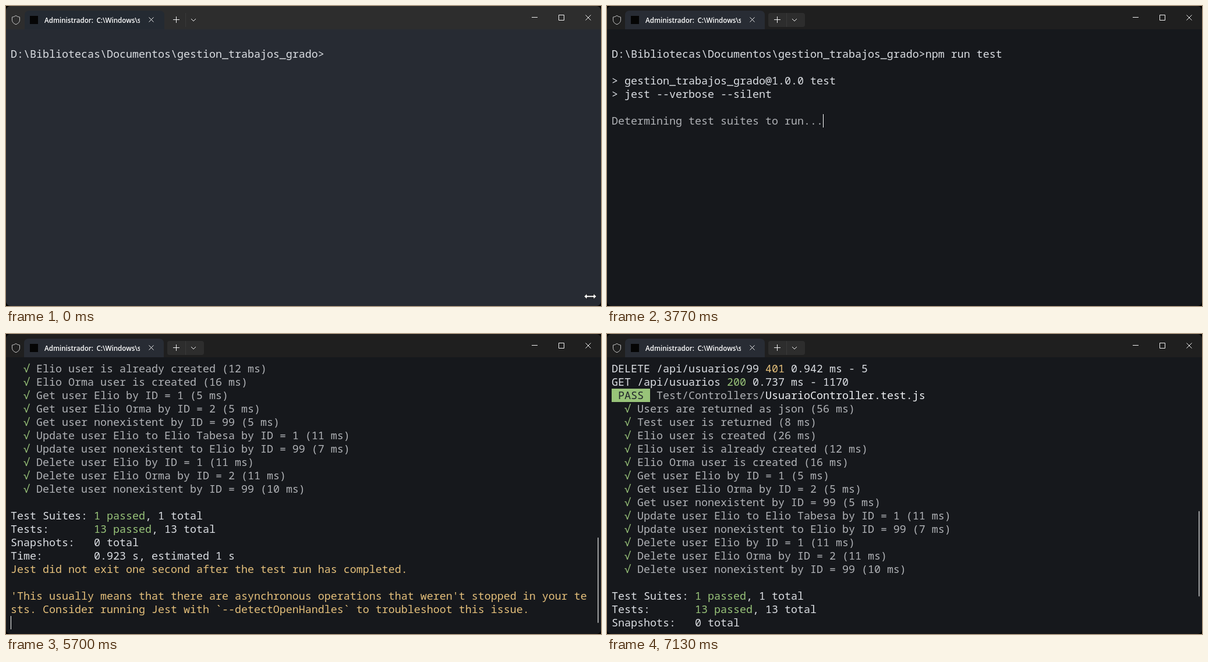
Animation, 1022 px wide and 516 px high, one loop 8000 ms. Source, as an HTML page:

```html
<!DOCTYPE html>
<html lang="es">
<head>
<meta charset="utf-8">
<title>Terminal</title>
<style>
html, body { margin: 0; width: 100%; height: 100%; overflow: hidden; background: #000; }
svg { display: block; width: 1022px; height: 516px; }
text { white-space: pre; }
#rows { font: 500 18.333px "Noto Sans Mono", "DejaVu Sans Mono", monospace; }
#title { font: 600 11.6px "Open Sans", "Noto Sans", sans-serif; fill: #fff; }
.w { fill: #dcdfe4; }
.b { fill: #f0f2f5; }
.d { fill: #b1b3b7; }
.m { fill: #737985; }
.g { fill: #98c379; }
.y { fill: #e5c07b; }
.k { fill: #20242a; }
.line { fill: none; stroke: #f2f2f2; stroke-width: 1; }
</style>
</head>
<body>
<svg viewBox="0 0 1022 516" xmlns="http://www.w3.org/2000/svg">
  <defs>
    <clipPath id="window"><rect width="1022" height="516" rx="8"/></clipPath>
    <clipPath id="label"><rect x="64" y="14" width="166" height="22"/></clipPath>
  </defs>
  <g clip-path="url(#window)">
    <rect id="bar" width="1022" height="40"/>
    <rect id="body" y="40" width="1022" height="476"/>
    <path id="tab" d="M0 40V16q0-8 8-8h224q8 0 8 8v24z"/>
    <path class="line" style="stroke:#c4c4c4" d="M17 16.5q3 2.4 6.5 2.6v5q0 5-6.500 7.700q-6.500-2.700-6.500-7.700v-5q3.500-.2 6.500-2.600z"/>
    <rect x="41" y="17" width="14" height="14" fill="#050505"/>
    <g id="title" clip-path="url(#label)">
      <text x="66" y="29">Administrador:</text>
      <text id="task" x="155.500" y="29"></text>
    </g>
    <rect id="split" x="277" y="12" width="63" height="24" rx="4" fill="#2d2d2d"/>
    <path d="M308.500 12v24" stroke="#3a3a3a"/>
    <path class="line" d="M245.500 19.500l8 8m0-8l-8 8M287 23.500h11M292.500 18v11M318 22l4 4 4-4M903 19.500h10M949.500 15.500h9v9h-9zM995.500 15.500l9 9m0-9l-9 9"/>
    <g id="rows"></g>
    <rect id="caret" width="1" height="23" fill="#fff"/>
    <rect id="thumb" x="1016" width="2" height="147" rx="1" fill="#9c9d9f"/>
  </g>
  <path id="resize" d="M993 499.500l5-5v3.500h11v-3.500l5 5-5 5v-3.500h-11v3.500z" fill="#fff" stroke="#000" stroke-width=".8"/>
  <path id="pointer" d="M0 0v16.500l3.800-3.600 2.500 5.900 2.700-1.200-2.500-5.700h5.300z" fill="#fff" stroke="#000" stroke-width=".9"/>
</svg>
<script>
const LOOP = 8000, CELL = 11, LINE = 23, LEFT = 8, TOP = 48, ROWS = 20;
const $ = id => document.getElementById(id);

// A tilde and a letter switch the text colour.
const prompt = 'D:\\Bibliotecas\\Documentos\\gestion_trabajos_grado>';
const command = 'npm run test';
const keyTimes = [930, 1130, 1200, 1400, 1570, 1670, 1770, 1900, 2200, 2300, 2370, 2530];
const script = ['', '> gestion_trabajos_grado@1.0.0 test', '> jest --verbose --silent', ''];
const suite = '~d Test/Controllers/~bUsuarioController.test.js';
const runs = '~k RUNS ' + suite, pass = '~k PASS ' + suite;

const request = (verb, id, code, ms, size) =>
  `${verb} /api/usuarios${id && '/' + id} ~${code < 300 ? 'g' : 'y'}${code}~w ${ms} ms - ${size}`;

const logs = ['~m✓ ~gUsers~d (0.7298ms)', ...[
  ['GET', '', 200, '24.428', 1170],
  ['GET', '', 200, '1.424', 1170],
  ['GET', '', 200, '1.263', 1170],
  ['POST', '', 201, '12.651', 138],
  ['GET', '', 200, '1.044', 1309],
  ['GET', '', 200, '0.875', 1309],
  ['POST', '', 401, '1.130', 72],
  ['GET', '', 200, '1.343', 1309],
  ['GET', '', 200, '1.040', 1309],
  ['POST', '', 201, '3.474', 153],
  ['GET', '', 200, '0.973', 1463],
  ['GET', '1', 200, '1.311', 138],
  ['GET', '2', 200, '1.065', 153],
  ['GET', '99', 401, '1.119', 72],
  ['PUT', '1', 200, '4.053', 157],
  ['GET', '1', 200, '0.973', 157],
  ['PUT', '99', 401, '1.027', 72],
  ['GET', '', 200, '0.894', 1482],
  ['DELETE', '1', 200, '3.126', 5],
  ['GET', '', 200, '0.815', 1324],
  ['DELETE', '2', 200, '3.048', 5],
  ['GET', '', 200, '0.782', 1170],
  ['DELETE', '99', 401, '0.942', 5],
  ['GET', '', 200, '0.737', 1170]
].map(r => request(...r))];

const tests = [
  'Users are returned as json (56 ms)',
  'Test user is returned (8 ms)',
  'Elio user is created (26 ms)',
  'Elio user is already created (12 ms)',
  'Elio Orma user is created (16 ms)',
  'Get user Elio by ID = 1 (5 ms)',
  'Get user Elio Orma by ID = 2 (5 ms)',
  'Get user nonexistent by ID = 99 (5 ms)',
  'Update user Elio to Elio Tabesa by ID = 1 (11 ms)',
  'Update user nonexistent to Elio by ID = 99 (7 ms)',
  'Delete user Elio by ID = 1 (11 ms)',
  'Delete user Elio Orma by ID = 2 (11 ms)',
  'Delete user nonexistent by ID = 99 (10 ms)'
].map(s => '  ~g√~d ' + s);

const summary = [
  '',
  'Test Suites: ~g1 passed~w, 1 total',
  'Tests:       ~g13 passed~w, 13 total',
  'Snapshots:   0 total',
  'Time:        0.923 s, estimated 1 s'
];
const warning = [
  '~yJest did not exit one second after the test run has completed.',
  '',
  "~y'This usually means that there are asynchronous operations that weren't stopped in your te",
  '~ysts. Consider running Jest with `--detectOpenHandles` to troubleshoot this issue.'
];

const clamp = x => Math.max(0, Math.min(1, x));
const between = (t, a, b) => t >= a && t < b;
const mix = (a, b, k) => `rgb(${a.map((v, i) => Math.round(v + (b[i] - v) * k))})`;
const escape = s => s.replace(/&/g, '&amp;').replace(/</g, '&lt;').replace(/>/g, '&gt;');

function rowMarkup(line, i) {
  if (!line) return '';
  const y = TOP + i * LINE;
  const spans = ('~w' + line).split('~').slice(1).filter(p => p.length > 1)
    .map(p => `<tspan class="${p[0]}">${escape(p.slice(1))}</tspan>`).join('');
  const badge = line.startsWith('~k')
    ? `<rect class="${line === runs ? 'y' : 'g'}" x="${LEFT}" y="${y}" width="${6 * CELL}" height="${LINE}"/>` : '';
  return `${badge}<text x="${LEFT}" y="${y + 18}">${spans}</text>`;
}

// All lines printed so far, with the caret's cell.
function terminal(t) {
  const typed = keyTimes.filter(k => t >= k).length;
  const first = prompt + command.slice(0, typed);
  const lines = ['', first];
  if (t < 2900) return { lines, col: first.length, row: 1 };
  if (t < 3200) return { lines, col: 0, row: 2 };
  lines.push(...script);
  if (t < 3770) return { lines, col: 0, row: 6 };
  if (t < 3870) {
    const wait = 'Determining test suites to run...';
    lines.push('~d' + wait);
    return { lines, col: wait.length, row: 6 };
  }
  if (t < 4730) {
    const count = t < 4530 ? 0 : Math.min(logs.length, 2 + 5 * Math.floor((t - 4530) / 33.3));
    lines.push(...logs.slice(0, count), '', runs);
    return { lines, col: 0, row: lines.length - (count ? 1 : 0) };
  }
  lines.push(...logs, pass, ...tests, ...summary);
  if (t >= 5700) lines.push(...warning);
  lines.push('');
  return { lines, col: 0, row: lines.length - 1 };
}

const caretOff = [[0, 140], [670, 930], [3530, 3770], [4060, 4590], [4670, 5200], [5730, 6230]];

function pointerAt(t) {
  const enter = 1 - (1 - clamp((t - 6230) / 170)) ** 2;
  const leave = clamp((t - 6830) / 200) ** 2;
  return [1015 - 140 * enter + 150 * leave, 486 - 27 * enter + 12 * leave];
}

const show = (id, on) => $(id).setAttribute('visibility', on ? 'visible' : 'hidden');
let lastRows = null;

function draw(t) {
  const focus = clamp((t - 70) / 300);
  $('bar').setAttribute('fill', mix([45, 45, 45], [31, 31, 31], focus));
  $('body').setAttribute('fill', mix([39, 43, 51], [22, 24, 28], focus));
  $('tab').setAttribute('fill', mix([36, 42, 50], [40, 44, 52], focus));
  $('tab').setAttribute('transform', `translate(${t < 70 ? 32 : 31})`);
  $('split').setAttribute('opacity', focus);
  show('resize', t < 100);
  $('task').textContent = between(t, 2930, 3230) ? 'npm run test' : 'C:\\Windows\\system32';

  const { lines, col, row } = terminal(t);
  const back = t < 6530 ? 0 : t < 6770 ? 3 : 6;
  const top = Math.max(0, lines.length - ROWS) - back;
  const markup = lines.slice(top, top + ROWS).map(rowMarkup).join('');
  if (markup !== lastRows) $('rows').innerHTML = lastRows = markup;

  $('caret').setAttribute('x', LEFT + col * CELL);
  $('caret').setAttribute('y', TOP + (row - top) * LINE);
  show('caret', row - top < ROWS && !caretOff.some(([a, b]) => between(t, a, b)));

  $('thumb').setAttribute('y', 350 - back * 7.6);
  show('thumb', t >= 4730);

  $('pointer').setAttribute('transform', `translate(${pointerAt(t)})`);
  show('pointer', between(t, 6230, 7030));
}

const start = performance.now();
function tick() {
  draw((performance.now() - start) % LOOP);
  requestAnimationFrame(tick);
}
tick();
</script>
</body>
</html>
```
